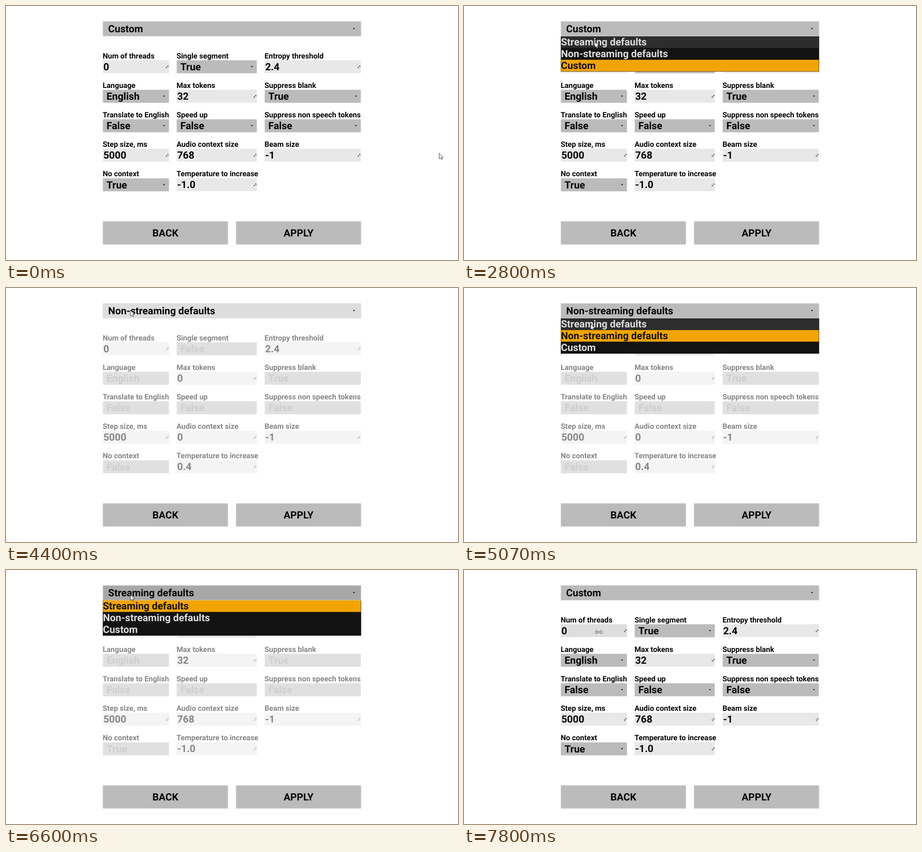
Write an HTML page that moves like this. It is 998 px wide and 561 px high and loops after 8000 ms.

```html
<!DOCTYPE html>
<html lang="en">
<head>
<meta charset="utf-8">
<title>Recognition settings</title>
<style>
  html, body { margin: 0; width: 100%; height: 100%; overflow: hidden; background: #fff; }
  svg { display: block; width: 998px; height: 561px; }
  text { font: 700 22.1px Roboto, sans-serif; text-rendering: geometricPrecision; white-space: pre; }
  .label { font-size: 16.45px; }
</style>
</head>
<body>
<svg id="stage" viewBox="0 0 998 561"></svg>
<script>
const stage = document.getElementById('stage');
const presets = ['Streaming defaults', 'Non-streaming defaults', 'Custom'];
const columns = [[213.7, 146.3], [376.7, 177.3], [571, 212.6]];

// label, kind (d = dropdown, s = spin box), value, value for non-streaming
const fields = [
  ['Num of threads', 's', '0'],
  ['Single segment', 'd', 'True', 'False'],
  ['Entropy threshold', 's', '2.4'],
  ['Language', 'd', 'English'],
  ['Max tokens', 's', '32', '0'],
  ['Suppress blank', 'd', 'True'],
  ['Translate to English', 'd', 'False'],
  ['Speed up', 'd', 'False'],
  ['Suppress non speech tokens', 'd', 'False'],
  ['Step size, ms', 's', '5000'],
  ['Audio context size', 's', '768', '0'],
  ['Beam size', 's', '-1'],
  ['No context', 'd', 'True', 'False'],
  ['Temperature to increase', 's', '-1.0', '0.4']
];

// pointer path: tick (1/15 s), x, y
const path = [
  [3, 956.5, 325], [4, 950, 334], [6, 898, 368], [8, 780, 378], [10, 610, 320],
  [12, 440, 225], [14, 322, 150], [16, 277, 118], [18, 281, 98], [20, 287, 79],
  [21, 287, 79], [26, 283, 63.5], [39, 283, 63.5], [47, 299, 105.2], [61, 299, 105.2],
  [66, 274.8, 49], [69, 275, 50], [76, 279.8, 79.5], [82, 279.8, 79.5],
  [86, 275, 54.5], [99, 275, 54.5], [105, 298, 136.5]
];

function pointerAt(k) {
  const i = path.findIndex(p => p[0] >= k);
  if (i < 0) return path[path.length - 1].slice(1);
  if (i === 0) return path[0].slice(1);
  const [a, x, y] = path[i - 1], [b, u, v] = path[i];
  const f = (k - a) / (b - a);
  return [x + (u - x) * f, y + (v - y) * f];
}

const rect = (x, y, w, h, fill, extra = '') =>
  `<rect x="${x}" y="${y}" width="${w}" height="${h}" fill="${fill}" ${extra}/>`;
const box = (x, y, w, h, fill, edge) =>
  rect(x + .4, y + .4, w - .8, h - .8, fill, `rx="1" stroke="${edge}" stroke-width=".8"`);
const text = (x, y, s, fill, extra = '') =>
  `<text x="${x}" y="${y}" fill="${fill}" ${extra}>${s}</text>`;
const arrow = (x, y, fill) => `<path d="M${x - 2.4} ${y - 1.2}h4.8l-2.4 2.6z" fill="${fill}"/>`;
const spinMark = (x, y, fill) =>
  `<path d="M${x - .4} ${y - 2.4}h2.9v2.9zM${x - 2.5} ${y - .3}v2.9h2.9z" fill="${fill}"/>`;

function drawField([label, kind, value, other], i, preset, hot) {
  const [x, w] = columns[i % 3], y = 119.7 + 65.2 * Math.floor(i / 3);
  const on = preset === 2, right = x + w;
  const ink = on ? '#060606' : '#878787';
  const shown = preset === 1 && other ? other : value;
  let out = text(x - .3, y - 4.2, label, ink, 'class="label"');
  if (kind === 'd') {
    const faint = on ? ink : '#cfcfcf';
    out += box(x, y, w, 29, on ? '#bbb' : '#e0e0e0', on ? '#c8c8c8' : '#e6e6e6');
    out += text(x + 8.2, y + 22.2, shown, faint) + arrow(right - 11, y + 14.3, faint);
  } else {
    out += rect(x, y, w, 28.5, hot ? '#dedede' : on ? '#e8e8e8' : '#f4f4f4', 'rx="1"');
    out += text(x + 1.2, y + 21.9, shown, ink) + spinMark(right - 4, y + 14.5, ink);
  }
  return out;
}

function drawMenu(selected, hover) {
  let out = rect(213.7, 67, 570.5, 78, '#131313');
  presets.forEach((name, i) => {
    const y = 67 + 25.9 * i, picked = i === selected;
    if (picked || i === hover)
      out += rect(214.3, y, 569.2, 25.6, picked ? '#f2a500' : '#2d2d2d');
    out += text(214, y + 20.3, name, picked ? '#131313' : '#dcdcdc');
  });
  return out;
}

function drawPointer(x, y, resize) {
  const d = resize
    ? 'M-8.8 0L-4.8-3.8V-1.3H4.8V-3.8L8.8 0L4.8 3.8V1.3H-4.8V3.8Z'
    : 'M0 0V12.9L2.9 10.2L4.9 14.6L6.9 13.7L5 9.4H8.8Z';
  return `<path transform="translate(${x} ${y})" d="${d}" fill="#fff" stroke="#111" stroke-width=".8"/>`;
}

const button = (x, name) => box(x, 475.5, 276.5, 51.5, '#bbb', '#c8c8c8') +
  text(x + 138.2, 509.2, name, '#060606', 'text-anchor="middle"');

function draw(k) {
  const [x, y] = pointerAt(k);
  const selected = k < 53 ? 2 : k < 78 ? 1 : k < 110 ? 0 : 2;
  const preset = k < 55 ? 2 : k < 80 ? 1 : k < 111 ? 0 : 2;
  const open = (k >= 38 && k < 55) || (k >= 68 && k < 80) || (k >= 99 && k < 111);
  const pressed = k === 68 || k === 99;
  const over = k >= 28 && y > 34 && y < 67;
  const resize = k >= 111;

  let out = box(213.7, 33.8, 570.5, 33.2, pressed ? '#a8a8a8' : over ? '#dedede' : '#bbb',
    over && !pressed ? '#d6d6d6' : '#c8c8c8');
  out += text(225.6, 57.8, presets[preset], '#060606') + arrow(768.3, 50, '#060606');
  fields.forEach((f, i) => out += drawField(f, i, preset, resize && i === 0));
  out += button(213.7, 'BACK') + button(507.7, 'APPLY');
  if (open) out += drawMenu(selected, Math.floor((y - 67) / 25.9));
  out += resize ? drawPointer(k < 117 ? 298.2 : 297.4, 137, true) : drawPointer(x, y, false);
  stage.innerHTML = out;
}

let last = -1;
function tick() {
  const k = Math.floor(performance.now() % 8000 * .015 + .1);
  if (k !== last) draw(last = k);
  requestAnimationFrame(tick);
}
tick();
</script>
</body>
</html>
```
